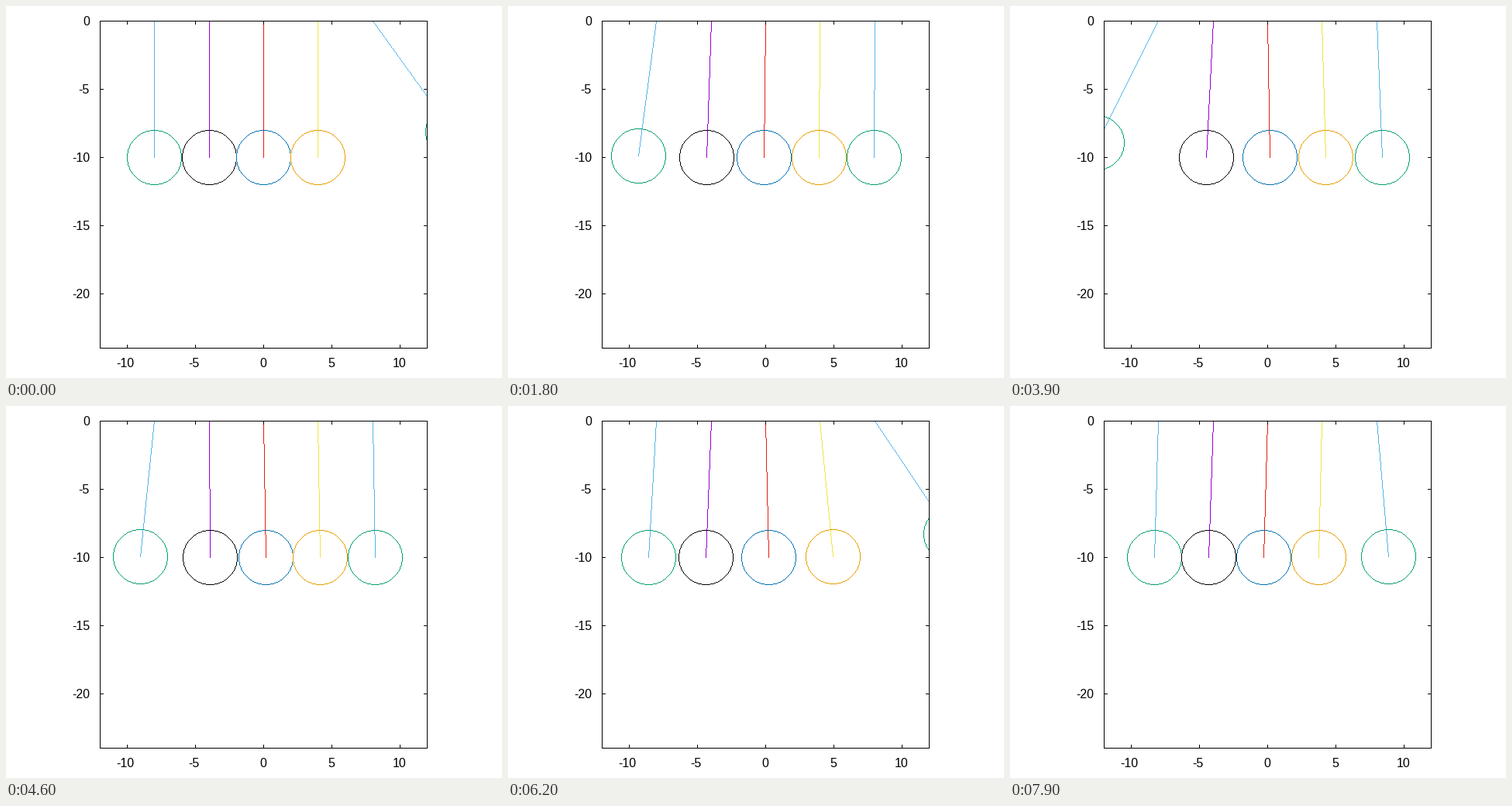
Animation of 640x480 px, one loop 8000 ms. Source, as a matplotlib script:

```python
import numpy as np
import matplotlib.pyplot as plt
from matplotlib.animation import FuncAnimation
from matplotlib.colors import to_rgb

W, H, DPI = 640, 480, 100
FRAMES, INTERVAL = 80, 100

# Plot box in pixels, data range 24 x 24
LEFT, TOP, SIDE = 121, 19, 422
RIGHT, BOTTOM = LEFT + SIDE, TOP + SIDE
UNIT = SIDE / 24
TICK = 4

# Cradle: five pendulums with Hertzian contacts, angles in radians
LENGTH, RADIUS = 10, 2
PIVOTS = np.array([-8, -4, 0, 4, 8])
START = np.pi / 5
GRAVITY = 1.021                     # g / length
STIFF = 2.6e4
STEP, SUBSTEPS = 0.0005, 200

SKY, GREEN = "#56b4e9", "#009e73"
ROD_COLORS = [SKY, "#9400d3", "#e51e10", "#f0e442", SKY]
BALL_COLORS = [GREEN, "#000000", "#0072b2", "#e69f00", GREEN]


def accel(theta):
    push = STIFF * np.maximum(theta[:-1] - theta[1:], 0) ** 1.5
    acc = -GRAVITY * np.sin(theta)
    acc[:-1] -= push
    acc[1:] += push
    return acc


def simulate():
    """Angles of all balls for every frame, by velocity Verlet."""
    theta = np.zeros(5)
    theta[-1] = START
    speed = np.zeros(5)
    acc = accel(theta)
    track = []
    for _ in range(FRAMES):
        for _ in range(SUBSTEPS):
            speed += acc * STEP / 2
            theta = theta + speed * STEP
            acc = accel(theta)
            speed += acc * STEP / 2
        track.append(theta)
    return np.array(track)


def nearest(v):
    return np.floor(np.asarray(v) + 0.5).astype(int)


def to_px(x, y):
    """Pixel that holds a data point."""
    return int(nearest(LEFT + (x + 12) * UNIT)), int(nearest(TOP - y * UNIT))


# Hard one-pixel lines, clipped to the plot box
def plot_pixels(img, x, y, color):
    ok = (x >= LEFT) & (x <= RIGHT) & (y >= TOP) & (y <= BOTTOM)
    img[y[ok], x[ok]] = nearest(np.array(to_rgb(color)) * 255)


def draw_line(img, x0, y0, x1, y1, color):
    n = max(abs(x1 - x0), abs(y1 - y0)) + 1
    plot_pixels(img, nearest(np.linspace(x0, x1, n)),
                nearest(np.linspace(y0, y1, n)), color)


def draw_circle(img, cx, cy, r, color):
    a = np.arange(int(r / np.sqrt(2)) + 1)
    b = nearest(np.sqrt(r * r - a * a))
    for sx in (-1, 1):
        for sy in (-1, 1):
            plot_pixels(img, cx + sx * a, cy + sy * b, color)
            plot_pixels(img, cx + sx * b, cy + sy * a, color)


def draw_axes(img):
    for x in (LEFT, RIGHT):
        draw_line(img, x, TOP, x, BOTTOM, "black")
    for y in (TOP, BOTTOM):
        draw_line(img, LEFT, y, RIGHT, y, "black")
    for v in range(-10, 11, 5):
        x, _ = to_px(v, 0)
        draw_line(img, x, TOP, x, TOP + TICK, "black")
        draw_line(img, x, BOTTOM - TICK, x, BOTTOM, "black")
    for v in range(-20, 1, 5):
        _, y = to_px(0, v)
        draw_line(img, LEFT, y, LEFT + TICK, y, "black")
        draw_line(img, RIGHT - TICK, y, RIGHT, y, "black")


def render(angles):
    img = np.full((H, W, 3), 255, dtype=np.uint8)
    xs = PIVOTS + LENGTH * np.sin(angles)
    ys = -LENGTH * np.cos(angles)
    radius = int(nearest(RADIUS * UNIT))
    for pivot, x, y, rod, ball in zip(PIVOTS, xs, ys, ROD_COLORS, BALL_COLORS):
        center = to_px(x, y)
        draw_line(img, *to_px(pivot, 0), *center, rod)
        draw_circle(img, *center, radius, ball)
    draw_axes(img)
    return img


track = simulate()

plt.rcParams["font.family"] = "Liberation Sans"
fig = plt.figure(figsize=(W / DPI, H / DPI), dpi=DPI, facecolor="white")
ax = fig.add_axes([0, 0, 1, 1])
ax.axis("off")
picture = ax.imshow(render(track[0]), extent=(0, W, H, 0), aspect="auto",
                    interpolation="nearest")


def label(x, y, value, align):
    ax.text(x, y, str(value), fontsize=16 * 72 / DPI, ha=align, va="baseline")


for v in range(-10, 11, 5):
    x, _ = to_px(v, 0)
    label(x - 2 * (v < 0), 466, v, "center")    # room for the sign
for v in range(-20, 1, 5):
    _, y = to_px(0, v)
    label(108, y + 6, v, "right")


def draw(i):
    picture.set_data(render(track[i]))
    return [picture]


anim = FuncAnimation(fig, draw, frames=FRAMES, interval=INTERVAL,
                     repeat=True, repeat_delay=0, blit=False)
plt.show()
```
